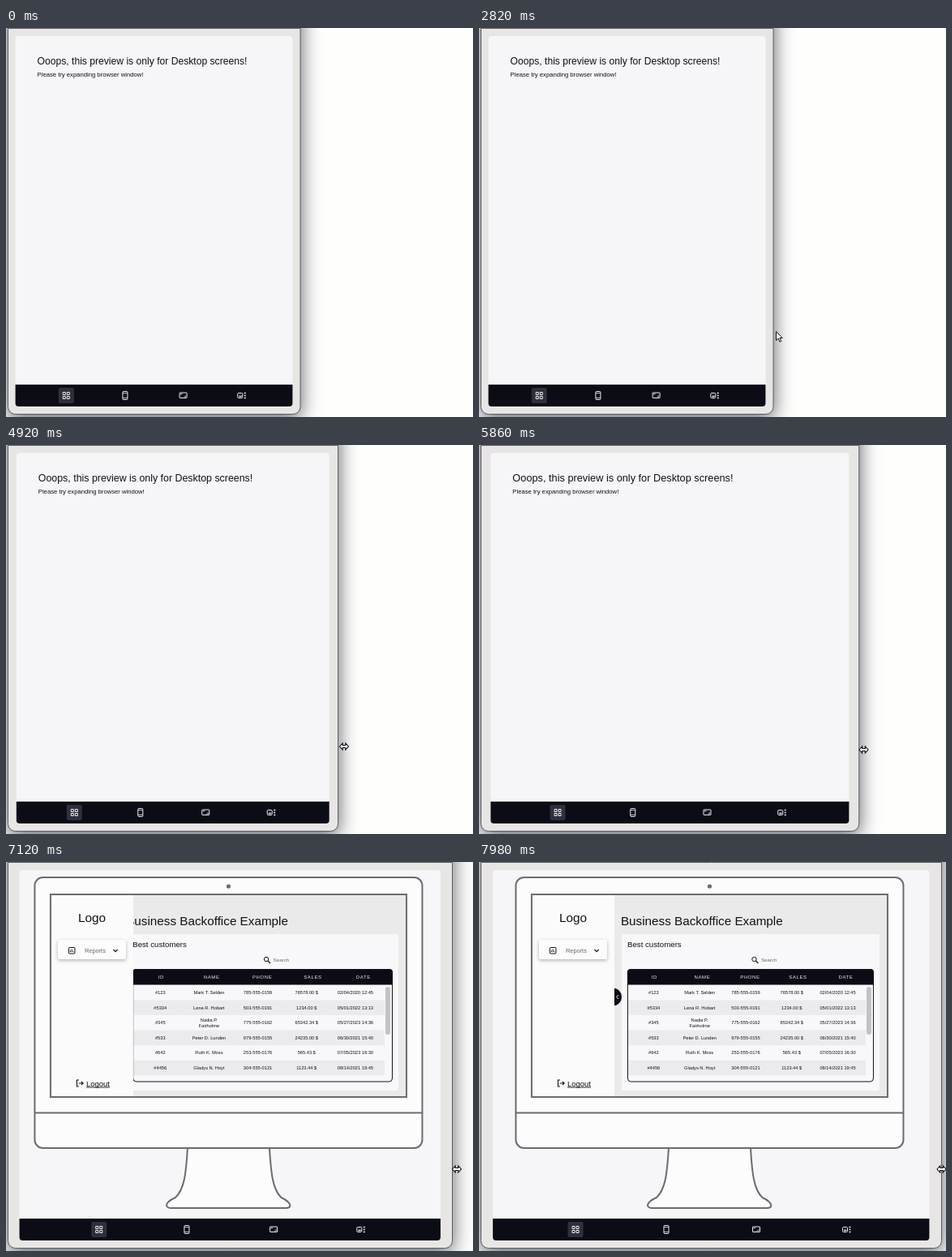
These frames come from a looping animation (576 px wide and 480 px high, 8000 ms). An HTML page with a canvas:

```html
<!DOCTYPE html>
<html lang="en">
<head>
<meta charset="utf-8">
<title>Resizing a desktop preview</title>
<style>
  html, body { margin: 0; width: 100%; height: 100%; overflow: hidden; }
  canvas { display: block; width: 576px; height: 480px; }
</style>
</head>
<body>
<canvas id="stage" width="576" height="480"></canvas>
<script>
const ctx = document.getElementById('stage').getContext('2d');
const LOOP = 8000, MONITOR_AT = 6840, SETTLE = 380;

const COLOR = {
  desk: '#fefefd', frame: '#e8e6e5', border: '#5c5c62', page: '#f6f6f8', bar: '#0c0c17',
  active: '#30303c', icon: '#ececf0', ink: '#111116', soft: '#66666c', outline: '#6c6c70',
  shell: '#fcfcfd', side: '#fbfbfc', body: '#ebeaeb', card: '#f8f8fa', stripe: '#ebeaec',
  thumb: '#c2c2c6', shadow: 'rgba(20,20,34,.7)', softShadow: 'rgba(40,40,60,.35)'
};

const EDGE = [[4000, 363], [4080, 368], [4920, 409.5], [5760, 465.5], [6600, 525.5],
  [7067, 550.5], [7953, 570.5]];
const POINTER = [[1000, 566, 430], [1500, 408, 395], [2200, 367, 375], [2820, 366.5, 374.5],
  [3250, 364, 371], [3900, 366, 371], [4080, 372, 371.5], [4920, 417, 372], [5807, 474.5, 376],
  [6600, 531, 378], [7067, 556, 379], [7953, 570.5, 379]];
const RESIZE_AT = 3250;

const COLUMNS = ['ID', 'NAME', 'PHONE', 'SALES', 'DATE'];
const ROWS = [
  ['#123', 'Mark T. Selden', '785-555-0159', '76578.00 $', '02/04/2020 12:45'],
  ['#5334', 'Lena R. Hobart', '503-555-0191', '1234.00 $', '05/01/2022 13:13'],
  ['#345', 'Nadia P.\nFairholme', '775-555-0162', '65342.34 $', '05/27/2023 14:36'],
  ['#533', 'Peter D. Lunden', '979-555-0155', '24235.00 $', '06/30/2021 15:40'],
  ['#642', 'Ruth K. Moss', '253-555-0176', '565.43 $', '07/05/2023 16:30'],
  ['#4456', 'Gladys N. Hoyt', '304-555-0121', '1123.44 $', '08/14/2021 19:45'],
  ['#2775', 'Norma D. Fells', '402-555-0137', '84.50 $', '09/11/2022 10:20']
];

function recordedTime(t) {
  const cycle = Math.floor((t - 20) / 140), phase = t - 20 - cycle * 140;
  const step = phase < 100 ? 0 : phase < 120 ? 1 : 2;
  return 20 + (cycle * 3 + step) * 140 / 3;
}

// Smooth curve through the keyframes, constant outside them.
function keyed(frames, t) {
  const last = frames.length - 1;
  if (t <= frames[0][0]) return frames[0].slice(1);
  if (t >= frames[last][0]) return frames[last].slice(1);
  const i = frames.findIndex(f => f[0] > t) - 1;
  const a = frames[i], b = frames[i + 1], span = b[0] - a[0], u = (t - a[0]) / span;
  const slope = (n, k) => {
    const before = frames[Math.max(n - 1, 0)], after = frames[Math.min(n + 1, last)];
    return (after[k] - before[k]) / (after[0] - before[0]) * span;
  };
  return a.slice(1).map((v, n) => {
    const k = n + 1;
    return v + (b[k] - v) * u * u * (3 - 2 * u)
      + slope(i, k) * u * (1 - u) ** 2 - slope(i + 1, k) * u * u * (1 - u);
  });
}

function box(x, y, w, h, r, fill, stroke, width = 1) {
  ctx.beginPath();
  ctx.roundRect(x, y, w, h, r);
  paint(fill, stroke, width);
}
function paint(fill, stroke, width = 1) {
  if (fill) { ctx.fillStyle = fill; ctx.fill(); }
  if (stroke) { ctx.strokeStyle = stroke; ctx.lineWidth = width; ctx.stroke(); }
}
function path(d, fill, stroke, width = 1) {
  const shape = new Path2D(d);
  if (fill) { ctx.fillStyle = fill; ctx.fill(shape); }
  if (stroke) { ctx.strokeStyle = stroke; ctx.lineWidth = width; ctx.stroke(shape); }
}
function disc(x, y, r, fill, stroke, width) {
  ctx.beginPath();
  ctx.arc(x, y, r, 0, Math.PI * 2);
  paint(fill, stroke, width);
}
function text(str, x, y, size, color = COLOR.ink, align = 'left') {
  ctx.font = `${size}px "Liberation Sans", Arial, sans-serif`;
  ctx.textAlign = align;
  ctx.fillStyle = color;
  ctx.fillText(str, x, y);
}
function at(x, y, draw) {
  ctx.save();
  ctx.translate(x, y);
  draw();
  ctx.restore();
}
function clipped(x, y, w, h, draw) {
  ctx.save();
  ctx.beginPath();
  ctx.rect(x, y, w, h);
  ctx.clip();
  draw();
  ctx.restore();
}
function withShadow(color, blur, dy, draw) {
  ctx.save();
  Object.assign(ctx, { shadowColor: color, shadowBlur: blur, shadowOffsetY: dy });
  draw();
  ctx.restore();
}

const BAR_ICONS = [
  () => {
    box(-9.5, -9.5, 19, 19, 2, COLOR.active);
    for (const [x, y] of [[-4, -4], [1, -4], [-4, 1], [1, 1]])
      box(x, y, 3, 3, 0, null, COLOR.icon);
  },
  () => {
    box(-2.5, -5, 6, 10, 1, null, COLOR.icon);
    path('M-2.5 -3H3.5M-2.5 3H3.5', null, COLOR.icon, .8);
  },
  () => {
    box(-4.5, -3.5, 9, 6.5, .5, null, COLOR.icon);
    path('M-3 -1V-2H-1M1 1.5H3V0', null, COLOR.icon, .8);
  },
  () => {
    box(-5, -3, 6, 6, 1, null, COLOR.icon);
    path('M-3.5 1H0M3 -3H5M3 0H5M3 3H5', null, COLOR.icon, 1.4);
  }
];

function drawBar(left, width) {
  box(left, 440, width, 27, [0, 0, 4, 4], COLOR.bar);
  const step = (width - 76) / 5 + 19;   // evenly spaced 19px items
  BAR_ICONS.forEach((icon, i) => at(left + width / 2 + (i - 1.5) * step, 453.5, icon));
}

function drawNotice(left, width) {
  text('Ooops, this preview is only for Desktop screens!', left + 27, 45, 10.02 + width * .00586);
  text('Please try expanding browser window!', left + 27, 60, 7.68);
}

function drawTable(left, right) {
  box(left, 132, right - left, 139, 4, COLOR.card);
  const center = (i, span) => left + 4 + (i + .5) * span / 5;
  const cellSpan = right - left - 20;
  clipped(left, 151, right - left, 120, () => ROWS.forEach((row, r) => {
    const mid = 161.2 + r * 18.55;
    if (r % 2) box(left + 1, mid - 9.3, right - left - 11, 18.6, 0, COLOR.stripe);
    row.forEach((cell, c) => {
      const lines = cell.split('\n');
      lines.forEach((line, k) => text(line, center(c, cellSpan),
        mid + 2 + (k - (lines.length - 1) / 2) * 6.4, 5.7, COLOR.ink, 'center'));
    });
  }));
  box(left, 132, right - left, 19.5, [4, 4, 0, 0], COLOR.bar);
  ctx.letterSpacing = '0.6px';
  COLUMNS.forEach((name, i) => text(name, center(i, right - left - 9), 143.5, 6, COLOR.icon, 'center'));
  ctx.letterSpacing = '0px';
  box(right - 9, 154, 6, 59, 3, COLOR.thumb);
  box(left + .5, 132.5, right - left - 1, 138.5, 4, null, COLOR.ink);
}

function drawContent(inset) {
  const left = 176 + inset, right = 494, mid = (left + right) / 2;
  box(65, 40, 439, 250, 0, COLOR.body);
  text('Business Backoffice Example', left - 1, 78, 15.25);
  box(left, 89, right - left, 193, 2, COLOR.card);
  text('Best customers', left + 7, 105, 9.7);
  disc(mid + 4.5, 120, 2.7, null, COLOR.ink, 1);
  path(`M${mid + 6.5} 122l3 3`, null, COLOR.ink, 1.1);
  text('Search', mid + 13, 123.3, 6.2, COLOR.soft);
  drawTable(left + 7, right - 7);
  disc(165 + inset, 166.5, 11, COLOR.bar);
  path(`M${172 + inset} 164l-2.5 2.5l2.5 2.5`, null, COLOR.icon);
}

function drawSidebar() {
  box(65, 40, 102, 250, 0, COLOR.side);
  text('Logo', 99, 74, 15.3);
  withShadow(COLOR.softShadow, 4, 1.5, () => box(74, 96, 84, 24, 2, COLOR.shell));
  box(87.5, 105.5, 7.5, 7.5, 1, null, COLOR.ink);
  path('M89.5 111V109M91.3 111V107.5M93 111V110', null, COLOR.ink, .9);
  text('Reports', 107, 112, 7.4, COLOR.soft);
  path('M142.5 108l2.6 2.6l2.6 -2.6', null, COLOR.ink, 1.1);
  path('M100 269H97.5V277H100M100 273H105M103 270.8L105.2 273L103 275.2', null, COLOR.ink, 1.1);
  text('Logout', 109, 276.5, 9.5);
  box(109, 277.6, 29, .9, 0, COLOR.ink);
}

function drawMonitor(time) {
  const u = Math.min(1, (time - MONITOR_AT) / SETTLE);
  path('M234 353C232 385 230 404 219 414Q208 419 208 424Q209 427 214 427H355Q360 427 360.5 424' +
    'Q360 419 349.5 414C339 404 337 385 335 353Z', COLOR.shell, COLOR.outline, 2);
  box(45.5, 19, 478, 334, 10, COLOR.shell, COLOR.outline, 2);
  path('M45.5 309.5H523.5', null, COLOR.outline, 2);
  disc(284.5, 30, 2.6, COLOR.outline);
  clipped(65, 40, 439, 250, () => {
    drawContent(-103 * (1 - u) ** 2);
    drawSidebar();
  });
  box(65, 40, 439, 250, 0, null, COLOR.outline, 2);
}

function drawPointer(time) {
  if (time < POINTER[0][0]) return;
  const [x, y] = keyed(POINTER, time);
  at(x, y, () => time < RESIZE_AT
    ? path('M0 0V11L2.6 8.6L4.4 12.7L6.2 12L4.4 8H7.7Z', '#fff', COLOR.ink)
    : path('M-5.5 0L-1.8 -4V-1.5H1.8V-4L5.5 0L1.8 4V1.5H-1.8V4Z', '#fff', COLOR.ink, 1.1));
}

function draw(time) {
  const edge = keyed(EDGE, time)[0];
  const frameEdge = time < 4100 ? EDGE[0][1] : edge;   // the frame catches up after its content
  const width = edge - 2, margin = width * .0265;
  const left = 2 + margin, inner = width - 2 * margin;

  box(0, 0, 576, 480, 0, COLOR.desk);
  withShadow(COLOR.shadow, 25, 6, () =>
    box(2.5, -60, frameEdge - 2.5, 536.5, [0, 0, 9, 9], COLOR.frame));
  box(2.5, .5, frameEdge - 2.5, 476, [0, 0, 9, 9], null, COLOR.border);
  box(left, 10, inner, 457, 4, COLOR.page);

  if (time < MONITOR_AT) drawNotice(left, width);
  else at(left + inner / 2 - 286.3, 0, () => drawMonitor(time));
  drawBar(left, inner);
  drawPointer(time);
}

const start = performance.now();
(function tick() {
  draw(recordedTime((performance.now() - start) % LOOP));
  requestAnimationFrame(tick);
})();
</script>
</body>
</html>
```
